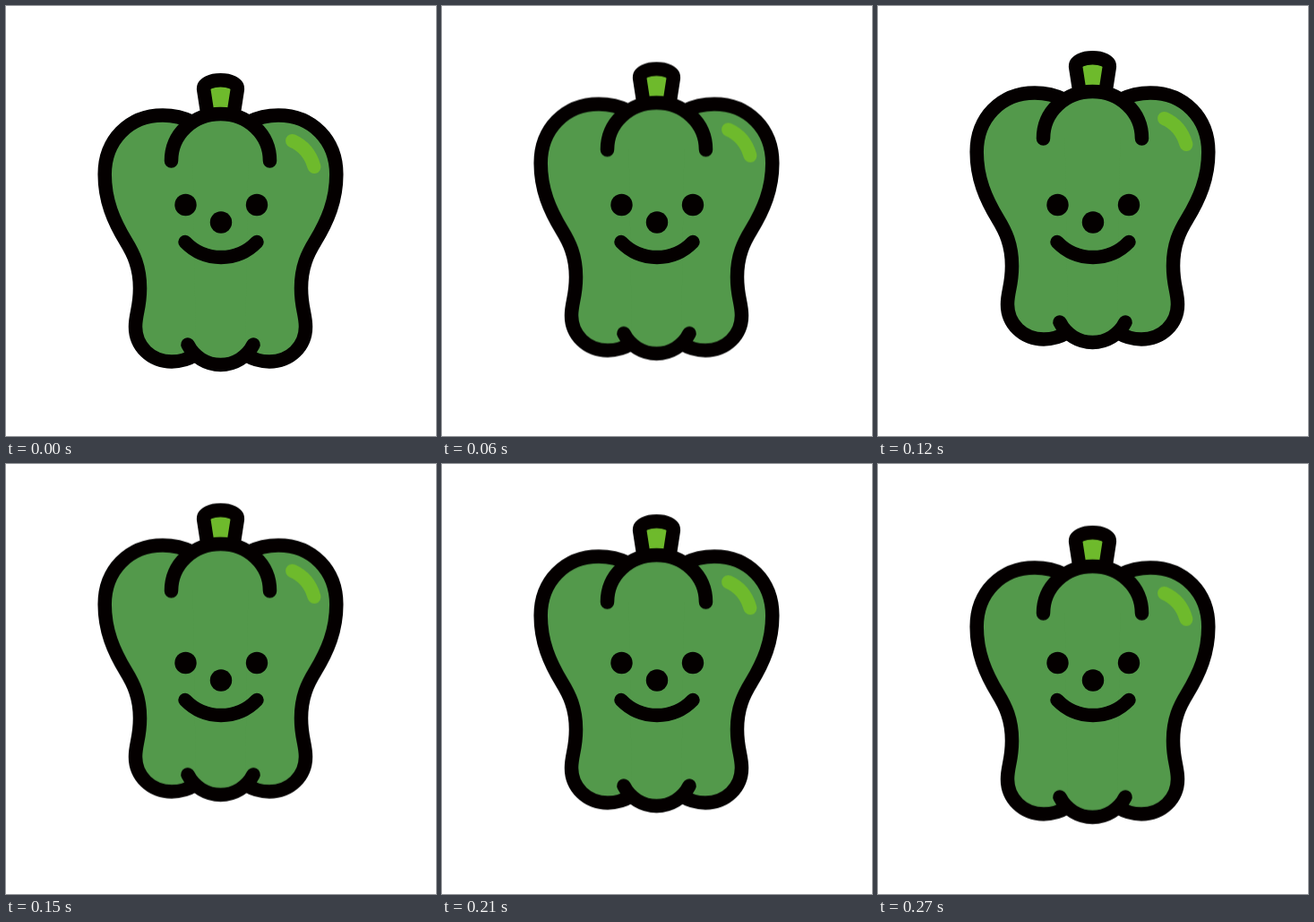
Animation of 480x480 px, one loop 0.3 s. Source, as an HTML page without scripts:

```html
<!DOCTYPE html>
<html lang="en">
<head>
<meta charset="utf-8">
<title>Bouncing pepper</title>
<style>
  html, body { margin: 0; width: 100%; height: 100%; overflow: hidden; background: #fff; }
  svg { display: block; width: 100vw; height: 100vh; }
  .line { stroke: #040000; stroke-width: 15.5; stroke-linecap: round; stroke-linejoin: round; }
  .skin { fill: #53994b; }
  .fresh { fill: #6eba2c; }
  .open { fill: none; }
  .shine { fill: none; stroke: #6eba2c; stroke-width: 15; stroke-linecap: round; }
  .body { animation: bounce 300ms infinite; }
  /* Ten even poses: five going up, five coming down */
  @keyframes bounce {
    0%, 100% { transform: translateY(0); animation-timing-function: steps(5, end); }
    50% { transform: translateY(-31.25px); animation-timing-function: steps(5, end); }
  }
</style>
</head>
<body>
<svg viewBox="0 0 480 480">
  <defs>
    <path id="side" class="line skin" d="M208 129.5 C198 124.5 187 122 175 122 C137 122 110.2 150 110.2 188 C110.2 217 120 240 134 263 C142 276 149.5 291 149.5 315 C149.5 337 144.5 344 144.5 358 C144.5 380 162 397 185 397 C195 397 204 394 212 389"/>
  </defs>
  <g class="body">
    <path class="line fresh" d="M224.5 118 L220.8 94 C219.5 86 230 82.7 239.5 82.7 S259.5 86 258.2 94 L254.5 118"/>
    <rect class="skin" x="205" y="150" width="69" height="232"/>
    <use href="#side"/>
    <use href="#side" transform="translate(479) scale(-1 1)"/>
    <path class="line skin" d="M184.5 173 C184.5 143 209 120.5 239.5 120.5 S294.5 143 294.5 173"/>
    <path class="line skin" d="M203 378 C210 392 224 400.5 239.5 400.5 S269 392 276 378"/>
    <path class="shine" d="M319.5 150.5 Q338 158.5 344 179.5"/>
  </g>
  <g fill="#040000">
    <circle cx="200.5" cy="222" r="12.2"/>
    <circle cx="280" cy="222" r="12.2"/>
    <circle cx="240" cy="241.5" r="12.2"/>
    <path class="line open" d="M200 263.5 A55.5 55.5 0 0 0 280 263.5"/>
  </g>
</svg>
</body>
</html>
```
